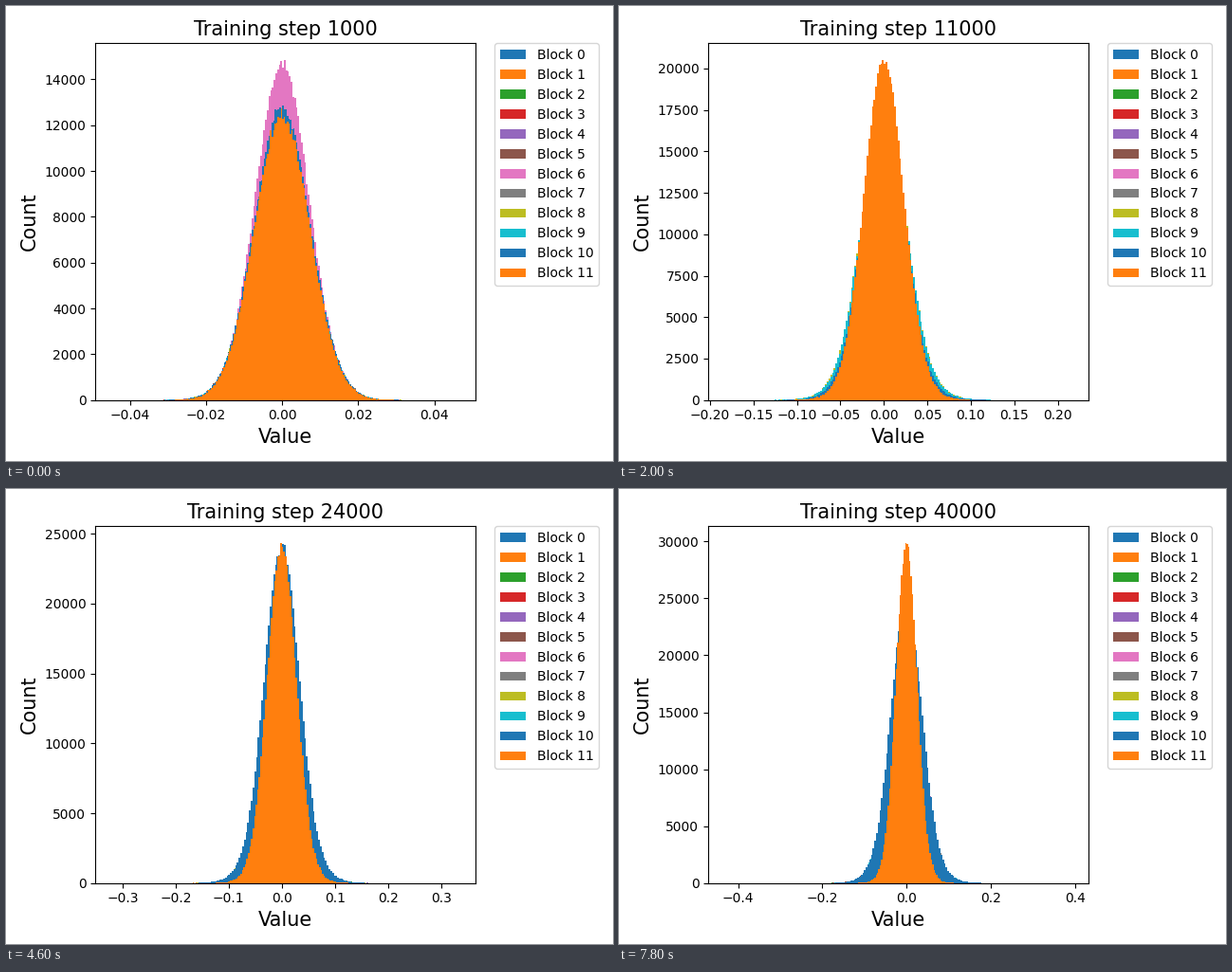
Recreate the animation shown at these times as a matplotlib script. Size 640x480 px, loop 8 s.

```python
import numpy as np
import matplotlib.pyplot as plt
from matplotlib.animation import FuncAnimation
from matplotlib.patches import Patch

W, H, DPI = 640, 480, 100
STEPS, INTERVAL = 40, 200
BLOCKS, BINS, WEIGHTS = 12, 200, 589824
TAIL_WIDTH = 1.5

# Key points of the view: step, left limit, right limit, highest count
VIEW = np.array([
    (0, -0.0491, 0.0508, 14832),
    (6, -0.1525, 0.1586, 18190),
    (10, -0.2020, 0.2355, 20492),
    (18, -0.2752, 0.3090, 22277),
    (28, -0.4270, 0.4200, 26370),
    (34, -0.4435, 0.4285, 28110),
    (39, -0.4710, 0.4325, 29841),
]).T


def view(step):
    return [np.interp(step, VIEW[0], row) for row in VIEW[1:]]


def smooth(u):
    u = np.clip(u, 0, 1)
    return u * u * (3 - 2 * u)


def gauss(x, s):
    return np.exp(-0.5 * (x / s) ** 2)


def shape(step, block, top):
    """Peak count, spread and tail share of one block's weights."""
    grown = 1 - np.exp(-step / 13)
    spread = 0.0073 + 0.0298 * grown
    tail = 0.02 + 0.13 * (1 - np.exp(-step / 6))
    rear = min(0.83 * top, 22000)
    # The blocks before the last ones spread out early, then fall back
    early = (step / 6 * np.exp(1 - step / 6)) ** 2
    if block == 6:
        return 14832, 0.965 * spread, tail
    if block == 8:
        return rear * (1 + 0.04 * early), spread * (1 + 0.115 * early), tail
    if block == 9:
        return rear * (1 + 0.08 * early), spread * (1 + 0.1 * early), tail
    if block == 10:
        return min(12850 + 540 * step, 24800, top), spread, tail
    if block == 11:
        narrow = 0.05 * grown + 0.27 * smooth((step - 15) / 18)
        return min(12750 + 907 * step, top), spread * (1 - narrow), tail / 2
    return rear, spread, tail


def histogram(step, block, top, limit):
    peak, s, tail = shape(step, block, top)
    area = s * np.sqrt(2 * np.pi) * (1 - tail + tail * TAIL_WIDTH)
    half = min(BINS / 2 * peak * area / WEIGHTS, limit)
    edges = np.linspace(-half, half, BINS + 1)
    mid = (edges[:-1] + edges[1:]) / 2
    mean = peak * ((1 - tail) * gauss(mid, s)
                   + tail * gauss(mid, TAIL_WIDTH * s))
    rng = np.random.default_rng(1000 * step + block)
    counts = rng.poisson(mean)
    return counts * peak / counts.max(), edges


fig, ax = plt.subplots(figsize=(W / DPI, H / DPI), dpi=DPI, facecolor="white")
title = ax.set_title("", fontsize=15)
ax.set_xlabel("Value", fontsize=15)
ax.set_ylabel("Count", fontsize=15)
colors = [f"C{b % 10}" for b in range(BLOCKS)]
ax.legend(handles=[Patch(facecolor=c, linewidth=0, label=f"Block {b}")
                   for b, c in enumerate(colors)],
          bbox_to_anchor=(1.05, 1), loc="upper left", borderaxespad=0)
bars = []


def update(step):
    while bars:
        bars.pop().remove()
    lo, hi, top = view(step)
    for block, color in enumerate(colors):
        counts, edges = histogram(step, block, top, (hi - lo) / 2.2)
        bars.append(ax.stairs(counts, edges, fill=True, color=color))
    ax.set_xlim(lo, hi)
    ax.set_ylim(0, 1.05 * top)
    title.set_text(f"Training step {1000 * (step + 1)}")
    return bars


update(0)
# The legend hangs off the axes, so the layout needs a few passes to settle
for _ in range(5):
    fig.tight_layout()

anim = FuncAnimation(fig, update, frames=STEPS, init_func=lambda: update(0),
                     interval=INTERVAL, repeat=True, repeat_delay=0)
plt.show()
```
